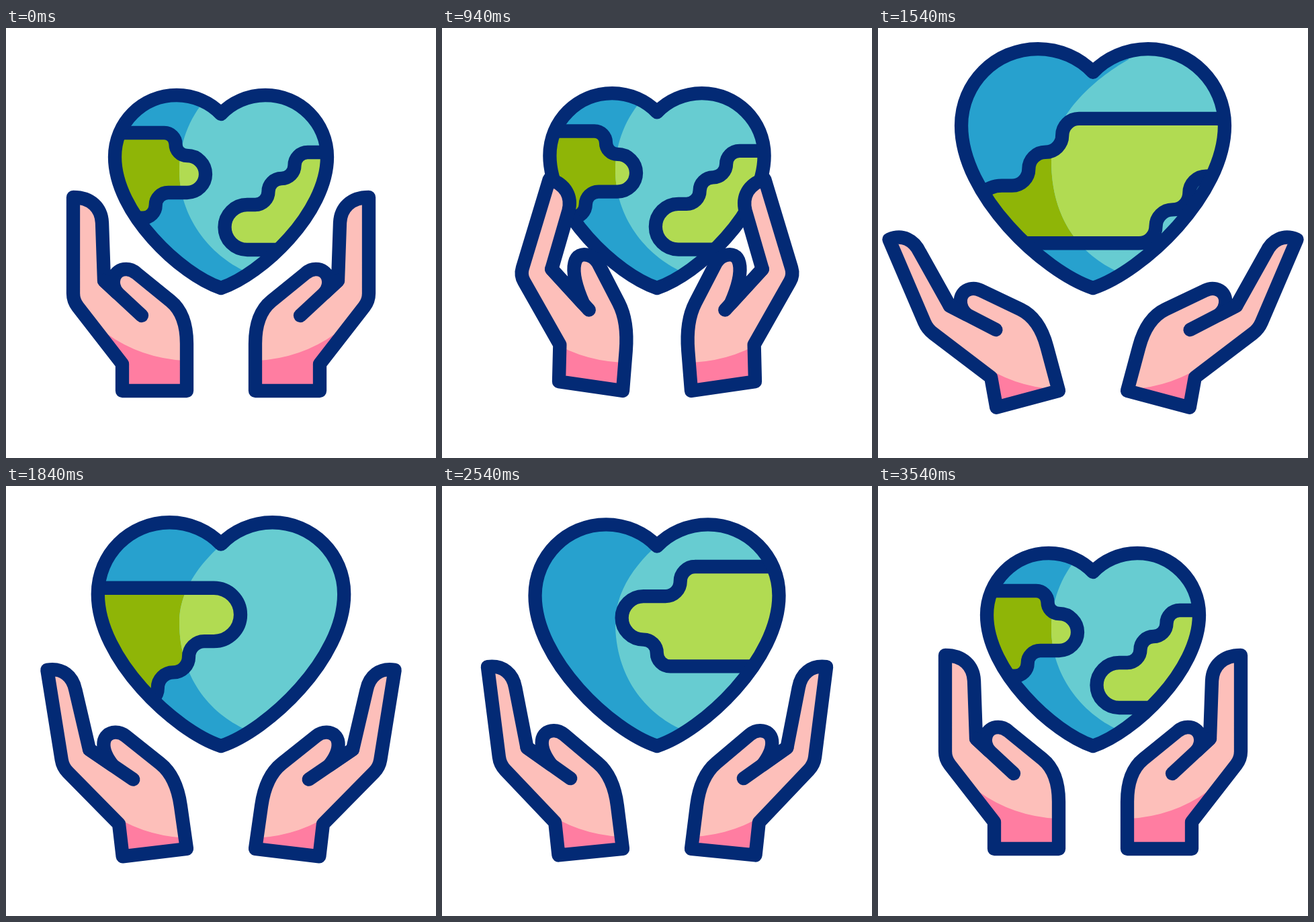
Write an HTML page with a canvas that moves like this. It is 640 px wide and 640 px high and loops after 3600 ms.

```html
<!DOCTYPE html>
<html lang="en">
<head>
<meta charset="utf-8">
<title>Heart-shaped Earth in caring hands</title>
<style>
  html, body { margin: 0; width: 100%; height: 100%; overflow: hidden; background: #fff; }
  canvas { display: block; }
</style>
</head>
<body>
<canvas id="stage" width="640" height="640"></canvas>
<script>
const ctx = document.getElementById('stage').getContext('2d');
const LOOP = 3600;
const NAVY = '#032a75', BLUE = '#27a1ce', TEAL = '#67ccd1';
const GREEN = '#8fb507', LIME = '#b1db52', SKIN = '#fdbfba', ROSE = '#ff7da1';

const lerp = (a, b, p) => a + (b - a) * p;
const mix = (a, b, p) => a.map((v, i) => lerp(v, b[i], p));
const add = (a, b) => [a[0] + b[0], a[1] + b[1]];
const smooth = p => p * p * (3 - 2 * p);
const radians = deg => deg * Math.PI / 180;

function spin(x, y, deg) {
  const c = Math.cos(radians(deg)), s = Math.sin(radians(deg));
  return [x * c - y * s, x * s + y * c];
}

// Index of the key that ends the span holding t.
const nextKey = (keys, t) => Math.max(1, keys.findIndex(k => k[0] > t));

// Joint settings of the hands; grow is the swelling of the heart.
const rest = { grow: [0], turn: [0], lift: [0, 0], finger: [0, 1, 1], web: [0],
  thumb: [0, 1], split: [.36], heel: [0, 0], drop: [0] };
const open = { grow: [1], turn: [-15.6], lift: [4, -5], finger: [-8.7, .8, .94], web: [-1],
  thumb: [1, .98], split: [.36], heel: [0, 2], drop: [44] };
const closed = { grow: [0], turn: [9.3], lift: [-7, -15], finger: [9.3, .96, .97], web: [-8],
  thumb: [10.5, 1.12], split: [.87], heel: [-7, 11], drop: [1] };

const BEATS = [[0, rest], [520, open], [1000, closed], [1600, open],
  [2200, closed], [2800, open], [3400, rest], [LOOP, rest]];

function poseAt(t) {
  const i = nextKey(BEATS, t), [t0, a] = BEATS[i - 1], [t1, b] = BEATS[i];
  const p = smooth((t - t0) / (t1 - t0)), pose = {};
  for (const joint in a) pose[joint] = mix(a[joint], b[joint], p);
  return pose;
}

// The globe turns once per loop, on a smooth curve that never runs backwards.
const WORLD = 905;
const TURN = [[0, 0], [520, -2], [940, -7.6], [1540, -145], [2140, -470],
  [2940, -786], [3540, -WORLD], [LOOP, -WORLD]];

const secant = i => (TURN[i + 1][1] - TURN[i][1]) / (TURN[i + 1][0] - TURN[i][0]);

function slope(i) {
  if (i === 0 || i === TURN.length - 1) return 0;
  const a = secant(i - 1), b = secant(i);
  return 2 * a * b / (a + b);
}

function turnAt(t) {
  const i = nextKey(TURN, t), [t0, x0] = TURN[i - 1], [t1, x1] = TURN[i];
  const span = t1 - t0, p = (t - t0) / span, r = 1 - p;
  return lerp(x0, x1, smooth(p)) + span * p * r * (r * slope(i - 1) - p * slope(i));
}

const arc = (r, sweep, dx, dy) => `a${r} ${r} 0 0 ${sweep} ${dx} ${dy}`;
// Two quarter arcs forming an S-shaped step.
const step = (r, sweep, sx, sy) => arc(r, sweep, sx * r, sy * r) + arc(r, 1 - sweep, sx * r, sy * r);

// Half of a land; the other half is the same, turned by 180 degrees.
const smallLand = s => step(17, 1, s, s) + arc(27.5, 1, 0, 55 * s) + `h${-28 * s}` + step(18.8, 0, -s, s);
const largeLand = s => step(19.5, 0, -s, s).repeat(2) + `h${-12 * s}` + arc(33.5, 0, 0, 67 * s);
const lands = new Path2D(
  `M111 156H235.5${smallLand(1)}H79.5${smallLand(-1)}Z` +
  `M449 185${largeLand(1)}H519${largeLand(-1)}Z`);

const heart = new Path2D('M320 387C260 367 162 275 162 192C162 141 203 100 254 100' +
  'C280 100 304 111 320 128C336 111 360 100 386 100C437 100 478 141 478 192C478 275 380 367 320 387Z');

// Scales a path about a point on the middle line, after sliding it sideways.
function placed(path, k, y, ...slides) {
  const out = new Path2D();
  for (const dx of slides) {
    out.addPath(path, new DOMMatrix([k, 0, 0, k, 320 + (dx - 320) * k, y - y * k]));
  }
  return out;
}

function fill(path, color) {
  ctx.fillStyle = color;
  ctx.fill(path);
}

function drawGlobe({ grow: [g] }, turn) {
  const shape = placed(heart, 1 + .247 * g, 387, 0);
  const land = placed(lands, 1 + .286 * g, 365, turn, turn + WORLD);
  const top = [298 + 77 * g, 105 - 60 * g];
  const light = new Path2D(`M${top[0]} -50L${top}C${272 + 50 * g} ${135 - 60 * g} 258 ${172 - 42 * g}` +
    ` 258 ${213 - 15 * g}C258 ${280 + 5 * g} 302 338 358 363L400 385H800V-50Z`);

  ctx.save();
  ctx.clip(shape);
  fill(shape, BLUE);
  fill(land, GREEN);
  ctx.save();
  ctx.clip(light);
  fill(shape, TEAL);
  fill(land, LIME);
  ctx.restore();
  ctx.stroke(land);
  ctx.restore();
  ctx.stroke(shape);
}

const toward = (a, b, d) => mix(a, b, d / Math.hypot(b[0] - a[0], b[1] - a[1]));
const corner = (p, from, to, before, after) =>
  `L${toward(p, from, before)}Q${p} ${toward(p, to, after)}`;

const shade = new Path2D('M-119 -85Q-69 -49 -4 -45H60V150H-200V-140Z');

// Drawn around the inner corner of the wrist.
function drawHand({ turn, lift, finger, web, thumb, split, heel, drop }) {
  const wrist = add([-96, -40], lift), knuckle = add([-169, -134], lift);
  const palm = add([0, -114], heel);
  const notch = [-123 + web[0], -164], creaseEnd = [-67, -112];
  const fork = mix(notch, creaseEnd, split[0]);
  const onFinger = (x, y) => add(knuckle, spin(x * finger[1], y * finger[2], finger[0]));
  const onThumb = (x, y) => add(creaseEnd, spin(x * thumb[1], y * thumb[1], thumb[0]));
  const tip = onFinger(0, -154), thumbBack = onThumb(-8, -63);

  const outline = new Path2D(`M0 0L-96 0L${wrist}` + corner(knuckle, wrist, tip, 11, 11) +
    `L${tip}C${onFinger(27, -154)} ${onFinger(42, -138)} ${onFinger(43, -116)}L${notch}L${fork}` +
    `C${onThumb(-48, -48)} ${onThumb(-42, -69)} ${onThumb(-23, -69)}Q${onThumb(-15, -69)} ${thumbBack}` +
    corner(palm, thumbBack, [0, 0], 31, 44) + 'Z');
  const crease = new Path2D(`M${notch}L${creaseEnd}`);
  const angle = radians(turn[0]);

  ctx.save();
  ctx.translate(269, 540);
  ctx.rotate(angle);
  fill(outline, SKIN);
  ctx.save();
  ctx.clip(outline);
  ctx.rotate(-angle);
  ctx.translate(0, drop[0]);
  fill(shade, ROSE);
  ctx.restore();
  ctx.stroke(outline);
  ctx.stroke(crease);
  ctx.restore();
}

function draw(now) {
  const t = now % LOOP, pose = poseAt(t);
  ctx.fillStyle = '#fff';
  ctx.fillRect(0, 0, 640, 640);
  ctx.strokeStyle = NAVY;
  ctx.lineWidth = 20.3;
  ctx.lineCap = ctx.lineJoin = 'round';
  drawGlobe(pose, turnAt(t));
  drawHand(pose);
  ctx.save();
  ctx.translate(640, 0);
  ctx.scale(-1, 1);
  drawHand(pose);
  ctx.restore();
}

const start = performance.now();
function tick() {
  draw(performance.now() - start);
  requestAnimationFrame(tick);
}
tick();
</script>
</body>
</html>
```
